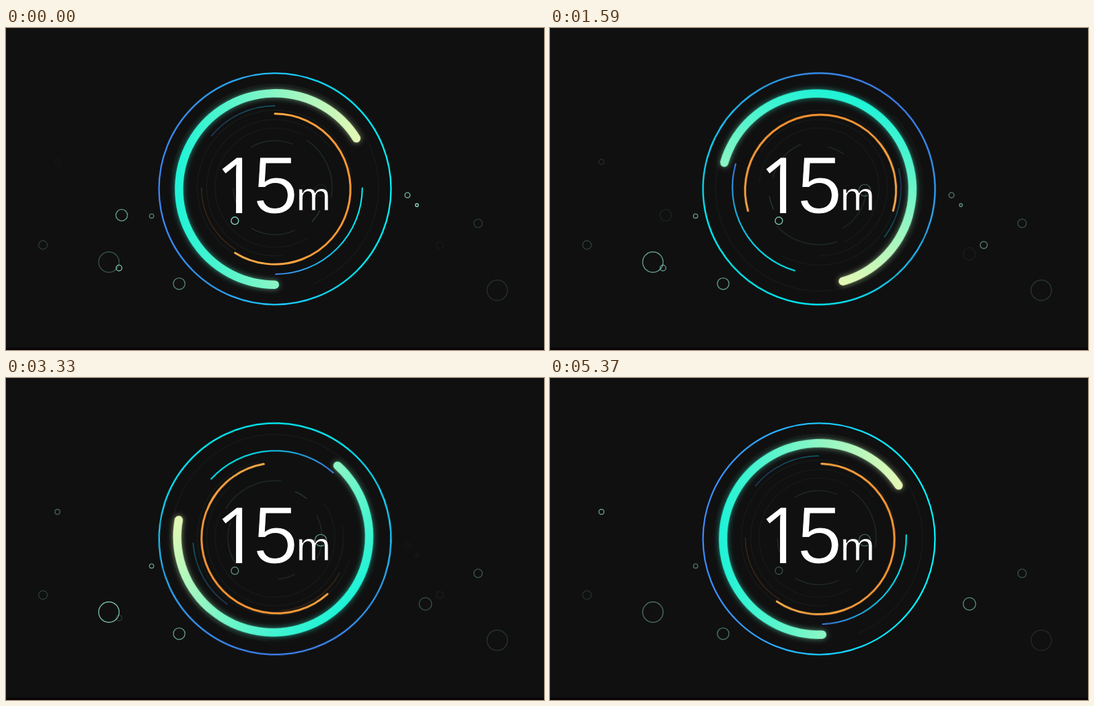
Recreate the animation shown at these times as an HTML page. Size 800 px wide and 480 px high, loop 5.4 s.

```html
<!DOCTYPE html>
<html lang="en">
<head>
<meta charset="utf-8">
<title>Timer rings</title>
<style>
  html, body { margin: 0; width: 100%; height: 100%; overflow: hidden; background: #101010; }
  svg { display: block; width: 800px; height: 480px; }
  path, circle { fill: none; }
  .spin { animation: turn 5.4s linear infinite; }
  .back { animation-direction: reverse; }
  .lap { animation: lap 5.4s linear infinite; }
  #ring { transform-origin: 400px 239.8px; }
  #faint { transform-origin: 400px 238px; }
  #cyan { transform-origin: 400.5px 237.7px; }
  #orange { transform-origin: 401.7px 239.9px; }
  #green { transform-origin: 398px 238.8px; }
  #green path { stroke: url(#mint); stroke-width: 12.4; stroke-linecap: round; }
  #green .glow { filter: blur(4px); opacity: .55; }
  #bubbles circle { stroke: #92e6d1; stroke-width: 1.4; }
  /* a background-coloured outline slims the strokes */
  text { fill: #fff; stroke: #101010; stroke-width: 1.2px; font-family: "Liberation Sans", Arial, sans-serif; }
  .one { font: 115px "Open Sans", "Noto Sans", sans-serif; stroke: none; }
  .five { font-size: 120px; }
  .unit { font-size: 62px; stroke-width: .8px; }
  @keyframes turn { to { transform: rotate(360deg); } }
  /* one turn in 4.5 s, then a rest */
  @keyframes lap { 83.333%, 100% { transform: rotate(360deg); } }
</style>
</head>
<body>
<svg viewBox="0 0 800 480">
  <defs>
    <linearGradient id="sky" gradientUnits="userSpaceOnUse" x1="227" y1="0" x2="540" y2="0">
      <stop stop-color="#4086fa"/><stop offset="1" stop-color="#00f6ff"/>
    </linearGradient>
    <linearGradient id="mint" gradientUnits="userSpaceOnUse" x1="257" y1="0" x2="530" y2="0">
      <stop stop-color="#21f3d6"/><stop offset="1" stop-color="#e8f8b4"/>
    </linearGradient>
    <linearGradient id="amber" gradientUnits="userSpaceOnUse" x1="330" y1="0" x2="512" y2="0">
      <stop stop-color="#ffb04c"/><stop offset="1" stop-color="#ff9832"/>
    </linearGradient>
    <linearGradient id="aqua" gradientUnits="userSpaceOnUse" x1="401" y1="0" x2="522" y2="0">
      <stop stop-color="#4086fa"/><stop offset="1" stop-color="#00f6ff"/>
    </linearGradient>
    <linearGradient id="deep" gradientUnits="userSpaceOnUse" x1="304" y1="0" x2="400" y2="0">
      <stop stop-color="#4086fa"/><stop offset="1" stop-color="#00e8ff"/>
    </linearGradient>
  </defs>
  <rect width="800" height="480" fill="#101010"/>
  <rect y="476.5" width="800" height="3.5" fill="#090405"/>
  <g id="faint" class="lap"></g>
  <g id="ring" class="lap"><circle cx="400" cy="239.8" r="172.5" stroke="url(#sky)" stroke-width="2.3"/></g>
  <g id="cyan" class="spin"></g>
  <g id="orange" class="spin back"></g>
  <g id="green" class="spin"></g>
  <g id="bubbles"></g>
  <text><tspan class="one" x="311" y="275.5">1</tspan><tspan class="five" x="367.5" y="275.8">5</tspan><tspan class="unit" x="431.5" y="271.5">m</tspan></text>
</svg>
<script>
const LOOP = 5.4;

function add(parent, tag, attrs) {
  const el = document.createElementNS("http://www.w3.org/2000/svg", tag);
  for (const key in attrs) el.setAttribute(key, attrs[key]);
  return document.getElementById(parent).appendChild(el);
}

// Angles in degrees, counter-clockwise from the right, from < to.
function arc(parent, cx, cy, r, from, to, attrs) {
  const at = deg => {
    const a = deg * Math.PI / 180;
    return `${(cx + r * Math.cos(a)).toFixed(2)} ${(cy - r * Math.sin(a)).toFixed(2)}`;
  };
  const large = to - from > 180 ? 1 : 0;
  const d = `M${at(from)}A${r} ${r} 0 ${large} 0 ${at(to)}`;
  return add(parent, "path", { d, ...attrs });
}

function faint(r, from, to, opacity = .15, stroke = "#7fe0c8", width = 1.2) {
  arc("faint", 400, 238, r, from, to, { stroke, "stroke-width": width, opacity });
}

for (const r of [89, 101.5, 115.5, 154]) faint(r, 240 - 2 * r, 480 - 2 * r, .055);
faint(122, 90, 141, .38, "url(#deep)", 1.6);
faint(109.5, 180, 238, .17, "#ff9430", 1.6);
faint(70, 68, 121);
faint(70, 240, 295);
faint(85, -10, 56);
faint(75, -43, -27, .25);
faint(62, 181, 205);

arc("cyan", 400.5, 237.7, 129.3, -90, 0, { stroke: "url(#aqua)", "stroke-width": 2 });
arc("orange", 400, 240, 112.2, -122, 90,
  { stroke: "url(#amber)", "stroke-width": 3, "stroke-linecap": "round" });
for (const name of ["glow", "line"]) arc("green", 400, 240, 142.7, 32, 270, { class: name });

// Brightest at peak, fading on a bell curve as wide as span (seconds).
function bubble(cx, cy, r, peak, span = 5, high = .65) {
  const steps = 27;
  const frames = Array.from({ length: steps + 1 }, (_, i) => {
    const away = (i / steps * LOOP - peak) / span;
    return { opacity: high * Math.exp(-away * away) };
  });
  add("bubbles", "circle", { cx, cy, r })
    .animate(frames, { duration: LOOP * 1000, iterations: Infinity });
}

bubble(76.5, 199.5, 3.8, LOOP, 3);
bubble(172, 279, 8.6, 0, 1.1);
bubble(216.5, 280.3, 3.2, 2.4);
bubble(55, 323.5, 6.5, 2, 5, .22);
bubble(153, 349, 15.2, 3, 3, .8);
bubble(168, 357.7, 4.3, .3, 2.5, .8);
bubble(257.5, 381.2, 8.6, 2.4);
bubble(340.3, 287.3, 5.5, 0, 5, .9);
bubble(597, 249.2, 3.8, .4, 1.7, .8);
bubble(611, 264, 2.2, .4, 1.7, .95);
bubble(702, 291.2, 6.3, 3.6, 5, .32);
bubble(730.5, 391, 15.2, 2.2, 5, .18);
bubble(645, 323.5, 5.3, 1.7, 1.1, .5);
bubble(623.7, 336.7, 9.3, LOOP, 2.6, .55);
bubble(468, 241.8, 8.7, 3.6, 2.4);
</script>
</body>
</html>
```
